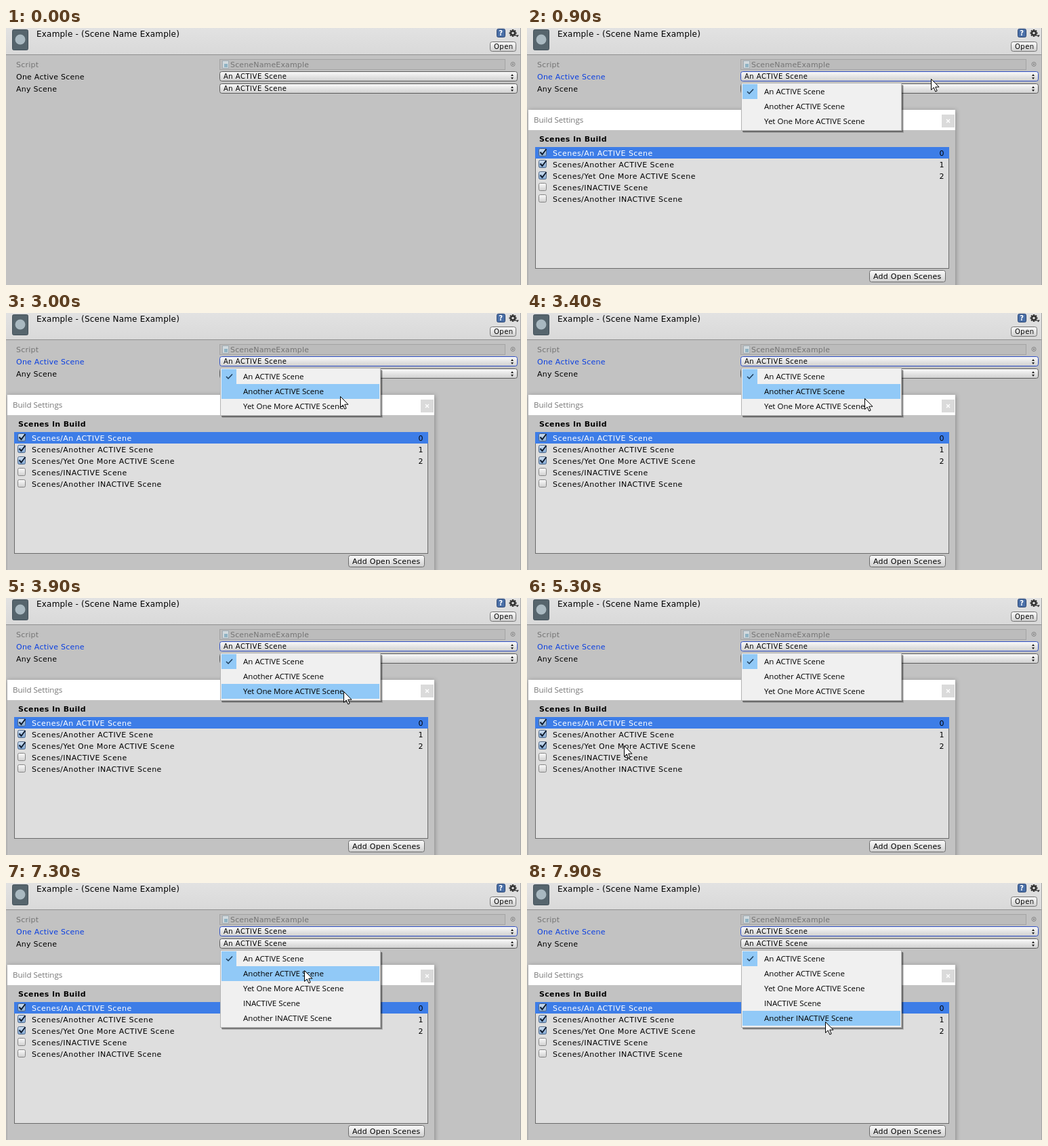
These frames come from a looping animation (760 px wide and 380 px high, 8000 ms). An HTML page:

```html
<!DOCTYPE html>
<html lang="en">
<head>
<meta charset="utf-8">
<title>Scene dropdown</title>
<style>
html, body { margin: 0; width: 100%; height: 100%; overflow: hidden; background: #c2c2c2; }
svg { display: block; }
text { font: 11px "DejaVu Sans", sans-serif; letter-spacing: .24px; white-space: pre; }
.head { font-size: 12px; letter-spacing: .2px; }
.small { font-size: 10px; letter-spacing: .5px; }
.tight { letter-spacing: .15px; }
.list { letter-spacing: .47px; }
.bold { font-weight: bold; letter-spacing: .33px; }
.menu { font: 11.55px "Open Sans", sans-serif; letter-spacing: 0; }
#win { filter: drop-shadow(1px 1px 3px rgba(0, 0, 0, .3)); }
#win.active { filter: drop-shadow(1px 2px 4px rgba(0, 0, 0, .5)); }
#winTitle { fill: #757575; }
#close { fill: #dadada; }
.active #winTitle { fill: #000; }
.active #close { fill: #c75050; }
</style>
</head>
<body>
<svg id="stage" width="760" height="380" viewBox="0 0 760 380">
  <defs>
    <linearGradient id="bar" x2="0" y2="1"><stop stop-color="#e2e2e2"/><stop offset="1" stop-color="#d9d9d9"/></linearGradient>
    <linearGradient id="button" x2="0" y2="1"><stop stop-color="#fbfbfb"/><stop offset="1" stop-color="#cfcfcf"/></linearGradient>
    <linearGradient id="ticked" x2="0" y2="1"><stop stop-color="#d3e2f2"/><stop offset="1" stop-color="#7fa6d2"/></linearGradient>
  </defs>
</svg>
<script>
const stage = document.getElementById('stage');
const SCENES = ['An ACTIVE Scene', 'Another ACTIVE Scene', 'Yet One More ACTIVE Scene',
  'INACTIVE Scene', 'Another INACTIVE Scene'];

const rect = (x, y, w, h, fill, extra = '') =>
  `<rect x="${x}" y="${y}" width="${w}" height="${h}" fill="${fill}" ${extra}/>`;
const box = (x, y, w, h, fill, stroke, r = 0, extra = '') =>
  rect(x + .5, y + .5, w - 1, h - 1, fill, `stroke="${stroke}" rx="${r}" ${extra}`);
const text = (x, y, s, cls = '', fill = '#000', extra = '') =>
  `<text x="${x}" y="${y}" class="${cls}" fill="${fill}" ${extra}>${s}</text>`;
const path = (d, fill, stroke = 'none', width = 1) =>
  `<path d="${d}" fill="${fill}" stroke="${stroke}" stroke-width="${width}"/>`;

const dropdown = (y, id) =>
  box(315, y, 440, 15, 'url(#button)', '#5c5c5c', 3, `id="${id}"`) +
  text(321, y + 11, SCENES[0], 'small') +
  path(`M745 ${y + 7}l2 -3 2 3zm0 2l2 3 2 -3z`, '#222');

const gear = Array.from({ length: 8 }, (_, i) =>
  rect(746.8, 2, 2.4, 3, '#333', `transform="rotate(${i * 45} 748 7.5)"`)).join('') +
  '<circle cx="748" cy="7.5" r="2.9" fill="none" stroke="#333" stroke-width="2.2"/>' +
  path('M752 10.5h5l-2.5 3z', '#333');

const inspector =
  rect(0, 0, 760, 380, '#c2c2c2') + rect(0, 0, 760, 39, 'url(#bar)') + rect(0, 39, 760, 1, '#8f8f8f') +
  box(9, 2, 24, 31, '#56656d', '#43515a', 2) +
  '<circle cx="21" cy="17" r="7.5" fill="#a9b9c1"/>' +
  text(45, 13, 'Example - (Scene Name Example)', 'head') +
  box(724, 1, 13, 13, '#4b70a8', '#2c4672', 2) + text(727.3, 11, '?', 'small bold', '#fff') + gear +
  box(714, 20, 39, 15, 'url(#button)', '#737373', 3) + text(720, 31, 'Open', 'small') +
  text(15, 58, 'Script', '', '#747474') +
  box(315, 46, 422, 16, '#bcbcbc', '#a3a3a3') +
  box(319, 48, 10, 12, '#d2dade', '#a2adb4') + rect(322, 53, 5, 5, '#8fb3c4') +
  text(331, 58, 'SceneNameExample', 'tight', '#747474') +
  '<circle cx="748" cy="53.5" r="3" fill="none" stroke="#858585"/><circle cx="748" cy="53.5" r="1" fill="#707070"/>' +
  text(15, 76, 'One Active Scene', '', '#000', 'id="label"') + text(15, 94, 'Any Scene') +
  dropdown(64, 'field') + dropdown(82, 'field2') +
  rect(759, 0, 1, 380, '#a4a4a4');

const sceneRow = (name, i) => {
  const y = 178 + 17 * i, on = i < 3;
  return box(17, y, 12, 12, on ? 'url(#ticked)' : 'url(#button)', on ? '#4f6685' : '#858585', 2) +
    (on ? path(`M19.5 ${y + 5.5}l3 3.5 6 -8`, 'none', '#0d1a2e', 2) + text(608.5, y + 11, i) : '') +
    text(38, y + 11, 'Scenes/' + name, 'list', i ? '#000' : '#fff');
};

const buildWindow = '<g id="win">' +
  rect(2, 121, 630, 270, '#c2c2c2') + rect(2, 121, 630, 30, '#fff') +
  text(10, 140, 'Build Settings', 'menu', '#000', 'id="winTitle"') +
  rect(612, 128, 19, 19, '#000', 'id="close"') +
  path('M619 135l5 5m0 -5l-5 5', 'none', '#fff', 1.3) +
  text(18, 168, 'Scenes In Build', 'bold') +
  box(12, 176, 611, 180, '#dedede', '#6a6a6a') + rect(12, 176, 611, 17, '#3d7de7') +
  SCENES.map(sceneRow).join('') +
  box(505, 358, 113, 18, 'url(#button)', '#6b6b6b', 3) + text(511, 371, 'Add Open Scenes') +
  '</g>';

const popup = (id, top, count) => `<g id="${id}">` +
  rect(319, top + 4, 237, count * 22 + 4, '#000', 'opacity=".16"') +
  rect(318, top + 3, 237, count * 22 + 4, '#000', 'opacity=".35"') +
  box(316, top, 237, count * 22 + 5, '#f0f0f0', '#b4b4b4') +
  rect(318, top + 2, 233, 22, '#91c9f7', 'class="hover"') +
  rect(318, top + 2, 22, 22, '#91c9f7', 'class="mark"') +
  path(`M325 ${top + 13}l3 3 6 -6.5`, 'none', '#1c3a57', 1.5) +
  SCENES.slice(0, count).map((s, i) => text(350, top + 17 + 22 * i, s, 'menu')).join('') + '</g>';

stage.innerHTML += inspector + buildWindow + popup('menuA', 81, 3) + popup('menuB', 99, 5) +
  '<g id="cursor">' + path('M.5 .5V16.5L4.2 13 6.8 19 9.2 18 6.7 12.2H12Z', '#fff', '#000') + '</g>';

const $ = id => document.getElementById(id);
const show = (id, opacity) => { $(id).style.opacity = opacity; };

// Pointer path: time, x, y
const POINTER = [
  [500, 650, 110], [800, 600, 75], [900, 596, 75], [1600, 596, 75], [2000, 540, 92],
  [2300, 508, 130], [2500, 510, 129], [2800, 496, 95], [2900, 496, 95], [3000, 493, 123],
  [3300, 500, 139], [3500, 496, 112], [3800, 497, 124], [3900, 498, 138], [4300, 540, 215],
  [4500, 556, 229], [4700, 558, 200], [4900, 566, 175], [5100, 330, 190], [5300, 143, 218],
  [5500, 60, 190], [5600, 75, 160], [6100, 234, 135], [6200, 234, 135], [6400, 439, 90],
  [6600, 439, 90], [7400, 440, 134], [7900, 440, 205], [8000, 440, 205]
];

function pointerAt(t) {
  const i = Math.max(1, POINTER.findIndex(p => p[0] > t));
  const [t0, x0, y0] = POINTER[i - 1], [t1, x1, y1] = POINTER[i];
  const k = Math.max(0, (t - t0) / (t1 - t0));
  return [Math.round(x0 + (x1 - x0) * k), Math.round(y0 + (y1 - y0) * k)];
}

function hover(id, top, count, x, y) {
  const row = x >= 318 && x < 551 ? Math.floor((y - top - 2) / 22) : -1;
  const bar = $(id).querySelector('.hover');
  bar.setAttribute('opacity', row >= 0 && row < count ? 1 : 0);
  bar.setAttribute('y', top + 2 + 22 * row);
  $(id).querySelector('.mark').setAttribute('fill', row === 0 ? '#56b0fa' : '#91c9f7');
}

function draw(now) {
  const t = Math.floor(now % 8000 / 100) * 100;
  const [x, y] = pointerAt(t), opened = t >= 500, focused = t >= 800;
  $('label').setAttribute('fill', focused ? '#0a3fe0' : '#000');
  $('field').setAttribute('stroke', focused ? '#2f4fc4' : '#5c5c5c');
  show('win', +opened);
  $('win').classList.toggle('active', t < 800 || t >= 6000 && t < 6600);
  show('menuA', t < 800 || t >= 6000 ? 0 : t < 900 ? .42 : 1);
  show('menuB', t < 6600 ? 0 : t < 6700 ? .42 : 1);
  hover('menuA', 81, 3, x, y);
  hover('menuB', 99, 5, x, y);
  show('cursor', +opened);
  $('cursor').setAttribute('transform', `translate(${x} ${y})`);
  requestAnimationFrame(draw);
}
requestAnimationFrame(draw);
</script>
</body>
</html>
```
